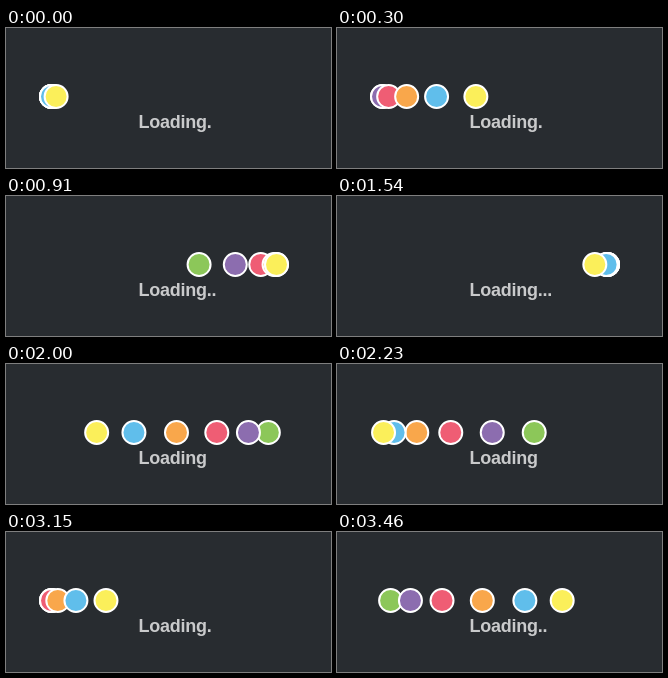
An HTML page that plays this animation: 325 by 140 pixels, repeating every 3.54 s.

```html
<!DOCTYPE html>
<html lang="en">
<head>
<meta charset="utf-8">
<title>Loading</title>
<style>
  html, body { margin: 0; width: 100%; height: 100%; overflow: hidden; background: #282c30; }
  svg { display: block; width: 325px; height: 140px; }
  circle { stroke: #fff; stroke-width: 2; }
  text { font: bold 18px "Liberation Sans", Arial, sans-serif; letter-spacing: -.25px; fill: #c9cacb; }
</style>
</head>
<body>
<svg viewBox="0 0 325 140"><text x="132.6" y="100"></text></svg>
<script>
const LOOP = 3540, FPS = 13, FRAMES = 46;
const CYCLE = 2943, START = -90, TURN = 1481, TRAVEL = 883, STAGGER = 98;
const LEFT = 45.5, RIGHT = 270.5;
const TEXT_START = -1045;

// Back to front; the last ball leads.
const colors = ['#8cc759', '#8c6daf', '#ef5d74', '#f9a74b', '#60beeb', '#fbef5a'];
const svg = document.querySelector('svg');
const label = document.querySelector('text');
const balls = colors.map(fill => {
  const ball = document.createElementNS(svg.namespaceURI, 'circle');
  const attrs = { cy: 68.5, r: 11.5, fill };
  for (const name in attrs) ball.setAttribute(name, attrs[name]);
  return svg.appendChild(ball);
});

const mod = (a, n) => ((a % n) + n) % n;

// CSS ease-in-out: cubic-bezier(.42, 0, .58, 1)
function easeInOut(x) {
  if (x <= 0) return 0;
  if (x >= 1) return 1;
  let lo = 0, hi = 1, s;
  for (let i = 0; i < 24; i++) {
    s = (lo + hi) / 2;
    const bx = 1.26 * s * (1 - s) ** 2 + 1.74 * s * s * (1 - s) + s ** 3;
    if (bx < x) lo = s; else hi = s;
  }
  return s * s * (3 - 2 * s);
}

function draw(now) {
  // The motion is stepped at a fixed frame rate.
  const frame = Math.min(FRAMES - 1, Math.floor((now % LOOP + 17) * FPS / 1000));
  const time = frame * 1000 / FPS;

  balls.forEach((ball, i) => {
    const delay = (balls.length - 1 - i) * STAGGER;
    const phase = mod(time - START - delay, CYCLE);
    const progress = easeInOut(phase / TRAVEL) - easeInOut((phase - TURN) / TRAVEL);
    ball.setAttribute('cx', LEFT + (RIGHT - LEFT) * progress);
  });

  const dots = Math.floor(mod(time - TEXT_START, CYCLE) / (CYCLE / 4));
  label.textContent = 'Loading' + '.'.repeat(dots);
  requestAnimationFrame(draw);
}

draw(0);
</script>
</body>
</html>
```
